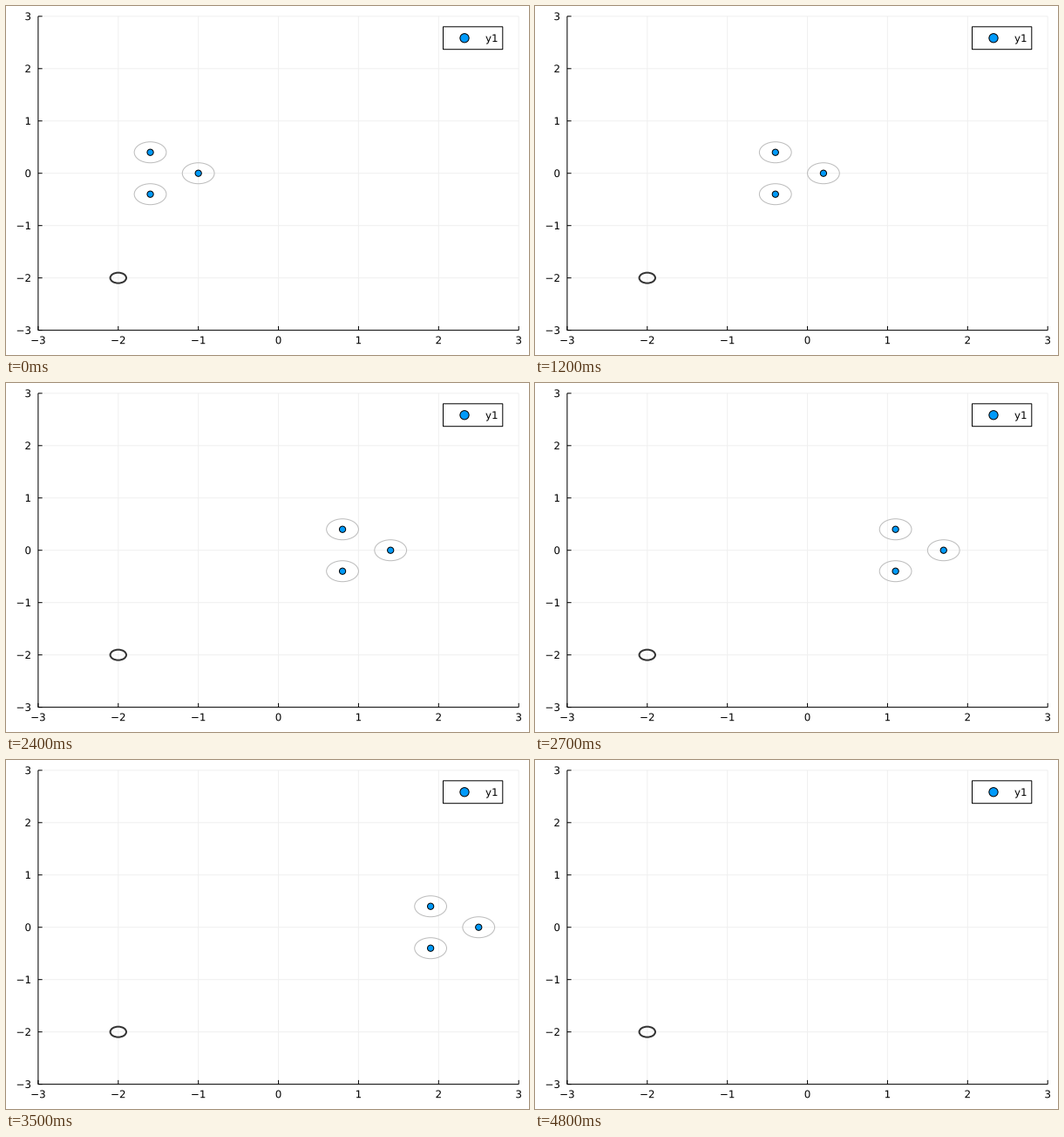
Animation of 600x400 px, one loop 10000 ms. Source, as a matplotlib script:

```python
import matplotlib.pyplot as plt
from matplotlib.animation import FuncAnimation
from matplotlib.patches import Ellipse, PathPatch, Rectangle
from matplotlib.textpath import TextPath
from matplotlib.transforms import Affine2D

W, H, DPI = 600, 400, 100
PX = 72 / DPI                      # points per pixel
LEFT, RIGHT, TOP, BOTTOM = 36.9, 588.19, 11.81, 371.61
SX, SY = (RIGHT - LEFT) / 6, (BOTTOM - TOP) / 6
FONT, HALF_CAP, TICK = 11.85, 4.32, 4.72
BLUE = "#009afa"
AGENTS = [(-1, 0), (-1.6, 0.4), (-1.6, -0.4)]
STEP, LAST, FRAMES = 0.1, 48, 100

plt.rcParams["font.family"] = "DejaVu Sans"
plt.rcParams["path.snap"] = False
fig = plt.figure(figsize=(W / DPI, H / DPI), dpi=DPI, facecolor="white")
ax = fig.add_axes([0, 0, 1, 1])
ax.set_xlim(0, W)
ax.set_ylim(H, 0)
ax.axis("off")


def to_px(x, y):
    return LEFT + (x + 3) * SX, TOP + (3 - y) * SY


def line(x0, y0, x1, y1, color="black", z=3):
    ax.plot([x0, x1], [y0, y1], color=color, lw=PX, zorder=z,
            solid_capstyle="butt")


def label(x, y, text, align=0.0):
    """Outline text on baseline y; align 0 is left, 0.5 center, 1 right."""
    # DejaVu advances: minus sign 0.838 em, digits 0.636 em
    width = FONT * sum(0.838 if c == "\u2212" else 0.636 for c in text)
    place = Affine2D().scale(1, -1).translate(x - align * width, y)
    path = TextPath((0, 0), text, size=FONT).transformed(place)
    ax.add_patch(PathPatch(path, fc="black", lw=0, zorder=6))


def oval(center, rx, ry, z, **style):
    return ax.add_patch(Ellipse(center, 2 * rx, 2 * ry, zorder=z, **style))


def dot(center, r, z):
    return oval(center, r, r, z, fc=BLUE, ec="black", lw=PX)


# Grid, ticks and axes
for v in range(-3, 4):
    x, y = to_px(v, v)
    text = str(v).replace("-", "\u2212")
    line(x, TOP, x, BOTTOM, "#f0f0f0", 1)
    line(LEFT, y, RIGHT, y, "#f0f0f0", 1)
    line(x, BOTTOM, x, BOTTOM - TICK)
    line(LEFT, y, LEFT + TICK, y)
    label(x, 387.21, text, 0.5)
    label(29, y + HALF_CAP, text, 1)
line(LEFT, TOP, LEFT, BOTTOM)
line(LEFT, BOTTOM, RIGHT, BOTTOM)

# Fixed ring
oval(to_px(-2, -2), 0.1 * SX, 0.1 * SY, 2, fc="none", ec="#333333", lw=2 * PX)

# Legend
ax.add_patch(Rectangle((501.5, 23.8), 68.3, 25.9, fc="white", ec="black",
                       lw=PX, zorder=5))
dot((526, 36.76), 5.12, 6)
label(550, 36.76 + HALF_CAP, "y1")

# Moving agents, each a dot inside a pale ring
window = Rectangle((LEFT, TOP), RIGHT - LEFT, BOTTOM - TOP,
                   transform=ax.transData)
pairs = []
for x, y in AGENTS:
    c = to_px(x, y)
    ring = oval(c, 0.2 * SX, 0.2 * SY, 2, fc="none", ec="#bcbcbc", lw=PX)
    pair = (ring, dot(c, 3.6, 4))
    for part in pair:
        part.set_clip_path(window)
    pairs.append(pair)


def update(i):
    for (x, y), pair in zip(AGENTS, pairs):
        for part in pair:
            part.set_center(to_px(x + STEP * i, y))
            part.set_visible(i < LAST)
    return [part for pair in pairs for part in pair]


anim = FuncAnimation(fig, update, frames=FRAMES, interval=100,
                     init_func=lambda: update(0), repeat=True, blit=False)
plt.show()
```
